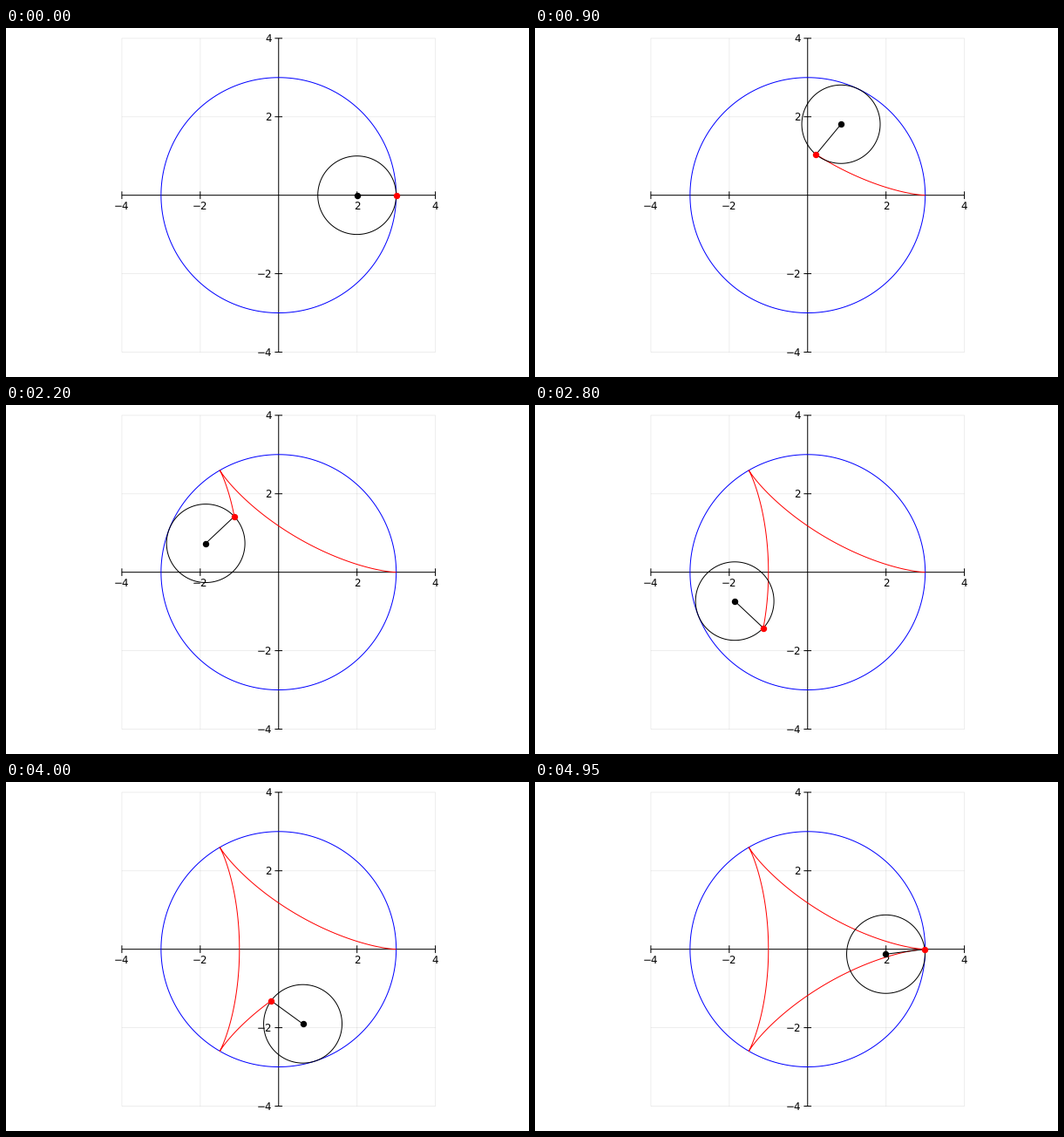
Recreate the animation shown at these times as a matplotlib script. Size 600x400 px, loop 5 s.

```python
import numpy as np
import matplotlib.pyplot as plt
from matplotlib.animation import FuncAnimation

W, H, DPI = 600, 400, 100
FRAMES, INTERVAL = 100, 50
CX, CY, UNIT = 312.75, 191.65, 44.96   # origin and scale in pixels
PX = 72 / DPI                          # one pixel in points
BIG, SMALL, LIM = 3, 1, 4
ARM = BIG - SMALL

plt.rcParams.update({"font.family": "DejaVu Sans", "path.simplify": False,
                     "text.hinting": "none"})

fig = plt.figure(figsize=(W / DPI, H / DPI), dpi=DPI, facecolor="white")
ax = fig.add_axes([0, 0, 1, 1])
ax.set_xlim(-CX / UNIT, (W - CX) / UNIT)
ax.set_ylim((CY - H) / UNIT, CY / UNIT)
ax.axis("off")


def line(x, y, color="black", z=1, **kw):
    kw = {"lw": PX, "solid_capstyle": "butt", "snap": False, **kw}
    return ax.plot(x, y, color=color, zorder=z, **kw)[0]


def dot(color, z):
    return line([], [], color, z, marker="o", ms=7.4 * PX, mew=0, ls="none")


def label(value, x, y, ha):
    text = str(value).replace("-", "\u2212")
    ax.text(x, y, text, ha=ha, va="baseline", fontsize=11.85 * PX, zorder=3)


def centre(t):
    return ARM * np.cos(t), ARM * np.sin(t)


def tracer(t):
    turn = ARM / SMALL * t
    x, y = centre(t)
    return x + SMALL * np.cos(turn), y - SMALL * np.sin(turn)


# Grid, axes, ticks and their labels
tick = 0.012 * 2 * LIM
for v in (-4, -2, 2, 4):
    line([v, v], [-LIM, LIM], alpha=0.07, z=0)
    line([-LIM, LIM], [v, v], alpha=0.07, z=0)
    line([v, v], [-tick, tick])
    line([-tick, tick], [v, v])
    if v != 0:
        label(v, v, -15.9 / UNIT, "center")
        label(v, -7.8 / UNIT, v - 4.3 / UNIT, "right")
line([-LIM, LIM], [0, 0])
line([0, 0], [-LIM, LIM])

round_trip = np.linspace(0, 2 * np.pi, 201)
ring_x, ring_y = np.cos(round_trip), np.sin(round_trip)
line(BIG * ring_x, BIG * ring_y, "blue", 4)
trail = line([], [], "red", 5)
wheel = line([], [], "black", 6)
spoke = line([], [], "black", 7)
hub = dot("black", 8)
pen = dot("red", 9)


def update(i):
    t = 2 * np.pi * i / FRAMES
    (hx, hy), (px, py) = centre(t), tracer(t)
    trail.set_data(*tracer(np.linspace(0, t, 2 * i + 2)))
    wheel.set_data(hx + SMALL * ring_x, hy + SMALL * ring_y)
    spoke.set_data([hx, px], [hy, py])
    hub.set_data([hx], [hy])
    pen.set_data([px], [py])
    return trail, wheel, spoke, hub, pen


anim = FuncAnimation(fig, update, frames=FRAMES, interval=INTERVAL,
                     init_func=lambda: update(0), repeat=True, repeat_delay=0)
plt.show()
```
